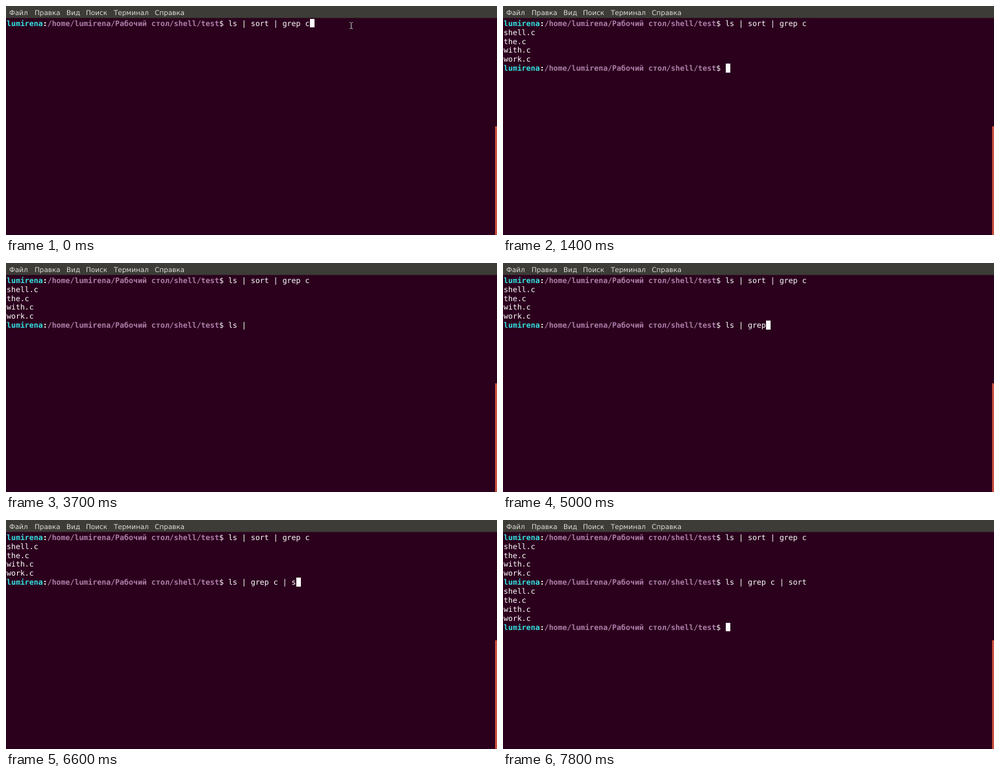
Animation, 756 px wide and 354 px high, one loop 7900 ms. Source, as an HTML page:

```html
<!DOCTYPE html>
<html lang="ru">
<head>
<meta charset="utf-8">
<style>
  html, body { margin: 0; width: 100%; height: 100%; overflow: hidden; background: #2b001d; }
  body { position: relative; text-rendering: geometricPrecision; }
  #menu { position: absolute; inset: 0 0 auto; height: 18px; background: #3d3c37;
    box-shadow: 0 1px #341e2a; color: #dfdbd2; font: 10.4px/18px "DejaVu Sans", sans-serif; }
  #menu span { position: absolute; top: 2px; white-space: pre; }
  #screen { position: absolute; left: 1px; top: 20.7px; margin: 0; color: #fff;
    font: 11.57px/13.9px "DejaVu Sans Mono", monospace; }
  #screen b { color: #ad7fa8; }
  #screen b.user { color: #34e2e2; }
  #cursor { position: absolute; margin: -1px 0 0 .4px; width: 6.97px; height: 13.4px; background: #fff; }
  #scrollbar { position: absolute; left: 753px; top: 186px; width: 3px; bottom: 0; background: #c9503f; }
  #pointer { position: absolute; left: 528px; top: 25px; }
</style>
</head>
<body>
<div id="menu"></div>
<pre id="screen"></pre>
<div id="scrollbar"></div>
<svg id="pointer" width="7" height="11" fill="none" stroke="#b9c4c0">
  <path d="M1 .5H2.5L3.5 1.5 4.5 .5H6M3.5 1V9.5M1 10H2.5L3.5 9 4.5 10H6"/>
</svg>
<script>
const LOOP = 7900, BLINK = 600;
const FIRST_ENTER = 900, SECOND_ENTER = 7300;
const COMMAND = 'ls | grep c | sort';
const KEY_TIMES = [1800, 2000, 2300, 3000, 3900, 4200, 4400, 4500, 4700,
                   5100, 5300, 5500, 5700, 6100, 6400, 6700, 6800, 6900];
const EVENTS = [0, FIRST_ENTER, ...KEY_TIMES, SECOND_ENTER];

const PROMPT = '<b class="user">lumirena</b><b style="color:#fff">:</b>' +
  '<b>/home/lumirena/Рабочий стол/shell/test</b>$ ';
const LISTING = 'shell.c\nthe.c\nwith.c\nwork.c\n';
const CURSOR = '<span id="cursor"></span>';

const byId = id => document.getElementById(id);
const screenEl = byId('screen'), pointer = byId('pointer');

const menuItems = { 'Файл': 5, 'Правка': 44, 'Вид': 93, 'Поиск': 123, 'Терминал': 166, 'Справка': 229 };
byId('menu').innerHTML = Object.entries(menuItems)
  .map(([label, x]) => `<span style="left:${x}px">${label}</span>`).join('');

function terminalText(t) {
  let text = PROMPT + 'ls | sort | grep c';
  if (t >= FIRST_ENTER) {
    const typed = KEY_TIMES.filter(time => time <= t).length;
    text += '\n' + LISTING + PROMPT + COMMAND.slice(0, typed);
  }
  if (t >= SECOND_ENTER) text += '\n' + LISTING + PROMPT;
  return text;
}

// Every key press restarts the blink with the cursor visible.
function cursorVisible(t) {
  const lastEvent = Math.max(...EVENTS.filter(time => time <= t));
  return Math.floor((t - lastEvent) / BLINK) % 2 === 0;
}

let shown = '';
function draw() {
  const t = performance.now() % LOOP;
  const html = terminalText(t) + (cursorVisible(t) ? CURSOR : '');
  if (html !== shown) screenEl.innerHTML = shown = html;
  pointer.style.display = t < FIRST_ENTER ? 'block' : 'none';
  requestAnimationFrame(draw);
}
draw();
</script>
</body>
</html>
```
